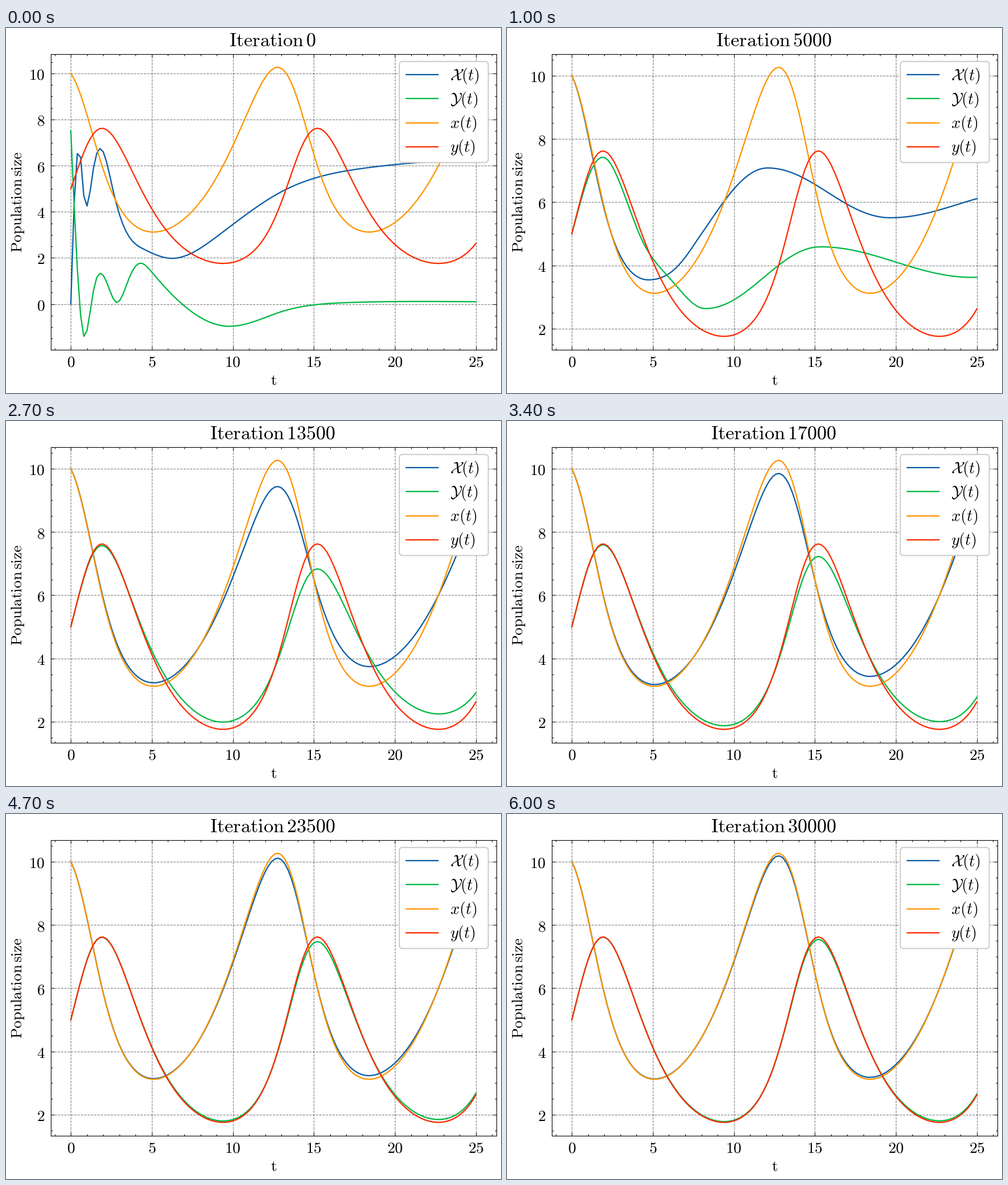
A matplotlib script that plays this animation: 872 by 642 pixels, repeating every 6100 ms.

```python
import matplotlib.pyplot as plt
import numpy as np
from matplotlib.animation import FuncAnimation
from matplotlib.patches import FancyBboxPatch
from matplotlib.ticker import FuncFormatter, MultipleLocator

W, H, DPI = 872, 642, 128
PX = 72 / DPI  # points per pixel
FRAMES, STEP_MS, ITERS_PER_FRAME = 61, 100, 500
COLORS = ["#0C5DA5", "#00B945", "#FF9500", "#FF2C00"]
LABELS = [r"$\mathcal{X}(t)$", r"$\mathcal{Y}(t)$", r"$x(t)$", r"$y(t)$"]
LINE = 2.3 * PX

plt.rcParams["mathtext.fontset"] = "cm"


def roman(s):
    return r"$\mathrm{" + s.replace(" ", r"\,") + "}$"


def flow(s):
    """Predator-prey rates."""
    x, y = s
    return np.array([0.4 * x - 0.1 * x * y, 0.1 * x * y - 0.6 * y])


def solve(times):
    rows = [np.array([10.0, 5.0])]
    dt = times[1] - times[0]
    for _ in times[1:]:
        s = rows[-1]
        k1 = flow(s)
        k2 = flow(s + dt / 2 * k1)
        k3 = flow(s + dt / 2 * k2)
        k4 = flow(s + dt * k3)
        rows.append(s + dt / 6 * (k1 + 2 * k2 + 2 * k3 + k4))
    return np.array(rows).T


def spline(points, at):
    """Natural cubic spline through (t, value) points."""
    knots, vals = np.array(points, float).T
    h, n = np.diff(knots), len(knots)
    system, rhs = np.eye(n), np.zeros(n)
    for i in range(1, n - 1):
        system[i, i - 1:i + 2] = h[i - 1], 2 * (h[i - 1] + h[i]), h[i]
    rhs[1:-1] = 6 * np.diff(np.diff(vals) / h)
    bend = np.linalg.solve(system, rhs)
    i = np.clip(np.searchsorted(knots, at) - 1, 0, n - 2)
    a = (knots[i + 1] - at) / h[i]
    b = 1 - a
    return (a * vals[i] + b * vals[i + 1]
            + ((a**3 - a) * bend[i] + (b**3 - b) * bend[i + 1]) * h[i]**2 / 6)


def turning_points(curve):
    """Start of the curve and each of its peaks and valleys."""
    slope = np.diff(curve)
    turns = np.flatnonzero(slope[:-1] * slope[1:] < 0) + 1
    k = np.r_[0, turns]
    return fine_t[k], curve[k]


t = np.linspace(0, 25, 126)
fine_t = np.linspace(0, 30, 1501)
exact = solve(fine_t)
truth = np.array([np.interp(t, fine_t, c) for c in exact])

# Untrained guess
raw = np.array([
    spline([(0, 0), (.2, 4.3), (.6, 6.37), (.8, 4.7), (1, 4.25), (1.4, 5.9), (2, 6.6),
            (2.6, 4.95), (3.2, 3.48), (4.5, 2.38), (6.2, 1.98), (9, 2.92), (13, 4.87),
            (18, 5.88), (25, 6.3)], t),
    spline([(0, 7.5), (.4, 1.55), (.8, -1.4), (1, -1.15), (1.4, .6), (2.2, .97),
            (2.8, .07), (3.6, 1.13), (4.25, 1.77), (5, 1.38), (7, -.08), (9.6, -.96),
            (13, -.33), (17, .06), (25, .1)], t),
])

# Turning points of the damped waves early in training
early = [
    [(0, 10), (4.7, 3.55), (12.05, 7.04), (19.7, 5.54), (28, 6.3)],
    [(0, 5), (1.9, 7.42), (8.2, 2.65), (15.35, 4.55), (24.8, 3.65), (34, 3.9)],
]


def learned(curve, start, left):
    """Exact wave bent so that its turning points lie part way back to start."""
    end_t, end_v = turning_points(curve)
    start_t, start_v = np.transpose(start)
    n = min(len(end_t), len(start_t))
    end_t, end_v, start_t, start_v = (a[:n] for a in (end_t, end_v, start_t, start_v))
    turn_t = end_t + (start_t - end_t) * left**3
    turn_v = end_v + (start_v - end_v) * left

    i = np.clip(np.searchsorted(turn_t, t, side="right") - 1, 0, n - 2)
    phase = (t - turn_t[i]) / (turn_t[i + 1] - turn_t[i])
    source_t = end_t[i] + phase * (end_t[i + 1] - end_t[i])
    steep = (np.interp(source_t, fine_t, curve) - end_v[i]) / (end_v[i + 1] - end_v[i])
    soft = (1 - np.cos(np.pi * phase)) / 2

    # Weak waves look like sines once the start is left behind
    ramp = np.clip((t - 4) / 4, 0, 1)
    mix = left**2 * ramp**2 * (3 - 2 * ramp)
    s = steep + (soft - steep) * mix
    return turn_v[i] + s * (turn_v[i + 1] - turn_v[i])


def prediction(iteration):
    if iteration == 0:
        return raw
    left = 0.01 + 1.05 / (1 + (iteration / 9900)**3.8)
    return np.array([learned(c, e, left) for c, e in zip(exact, early)])


fig = plt.figure(figsize=(W / DPI, H / DPI), dpi=DPI, facecolor="white")
ax = fig.add_axes([78.5 / W, 1 - 566 / H, 785 / W, 520.5 / H])
ax.set_xlim(-1.25, 26.25)
for axis, major, minor in ((ax.xaxis, 5, 1), (ax.yaxis, 2, 0.5)):
    axis.set_major_locator(MultipleLocator(major))
    axis.set_minor_locator(MultipleLocator(minor))
    axis.set_major_formatter(FuncFormatter(lambda v, _: f"${v:.0f}$"))
ax.tick_params(which="both", direction="in", top=True, right=True, width=PX)
ax.tick_params(which="major", length=6 * PX, labelsize=27.5 * PX)
ax.tick_params(which="minor", length=3 * PX)
ax.tick_params(axis="x", pad=7 * PX)
ax.tick_params(axis="y", pad=9.7 * PX)
ax.set_axisbelow(True)
ax.grid(color="k", alpha=0.5, linestyle="--", linewidth=1.1 * PX)
for side in ax.spines.values():
    side.set_linewidth(1.1 * PX)

lines = [ax.plot(t, c, color=color, lw=LINE)[0]
         for c, color in zip([*raw, *truth], COLORS)]

# Overlay in pixel units for the captions and the legend
page = fig.add_axes([0, 0, 1, 1], zorder=5)
page.set_xlim(0, W)
page.set_ylim(H, 0)
page.axis("off")


def caption(x, y, s, size, **kw):
    return page.text(x, y, s, size=size * PX, va="baseline", **kw)


title = caption(470, 31.7, "", 34.3, ha="center")
caption(471, 628.5, roman("t"), 27.5, ha="center")
caption(28, 306, roman("Population size"), 27.2, ha="center",
        rotation=90, rotation_mode="anchor")
page.add_patch(FancyBboxPatch((698.5, 64.5), 145.5, 166.5, boxstyle="round,pad=5.6",
                              fc="white", ec="0.8", lw=2 * PX))
for k, (color, label) in enumerate(zip(COLORS, LABELS)):
    y = 82.3 + 42.1 * k
    page.plot([705, 760.5], [y, y], color=color, lw=LINE)
    caption(782.5, y + 9.7, label, 28.2)


def draw(frame):
    iteration = frame * ITERS_PER_FRAME
    guess = prediction(iteration)
    for line, curve in zip(lines, guess):
        line.set_ydata(curve)
    low = min(guess.min(), truth.min())
    high = max(guess.max(), truth.max())
    margin = 0.05 * (high - low)
    ax.set_ylim(low - margin, high + margin)
    title.set_text(roman(f"Iteration {iteration}"))
    return [*lines, title]


anim = FuncAnimation(fig, draw, frames=FRAMES, interval=STEP_MS, repeat=True,
                     repeat_delay=0, blit=False)
plt.show()
```
